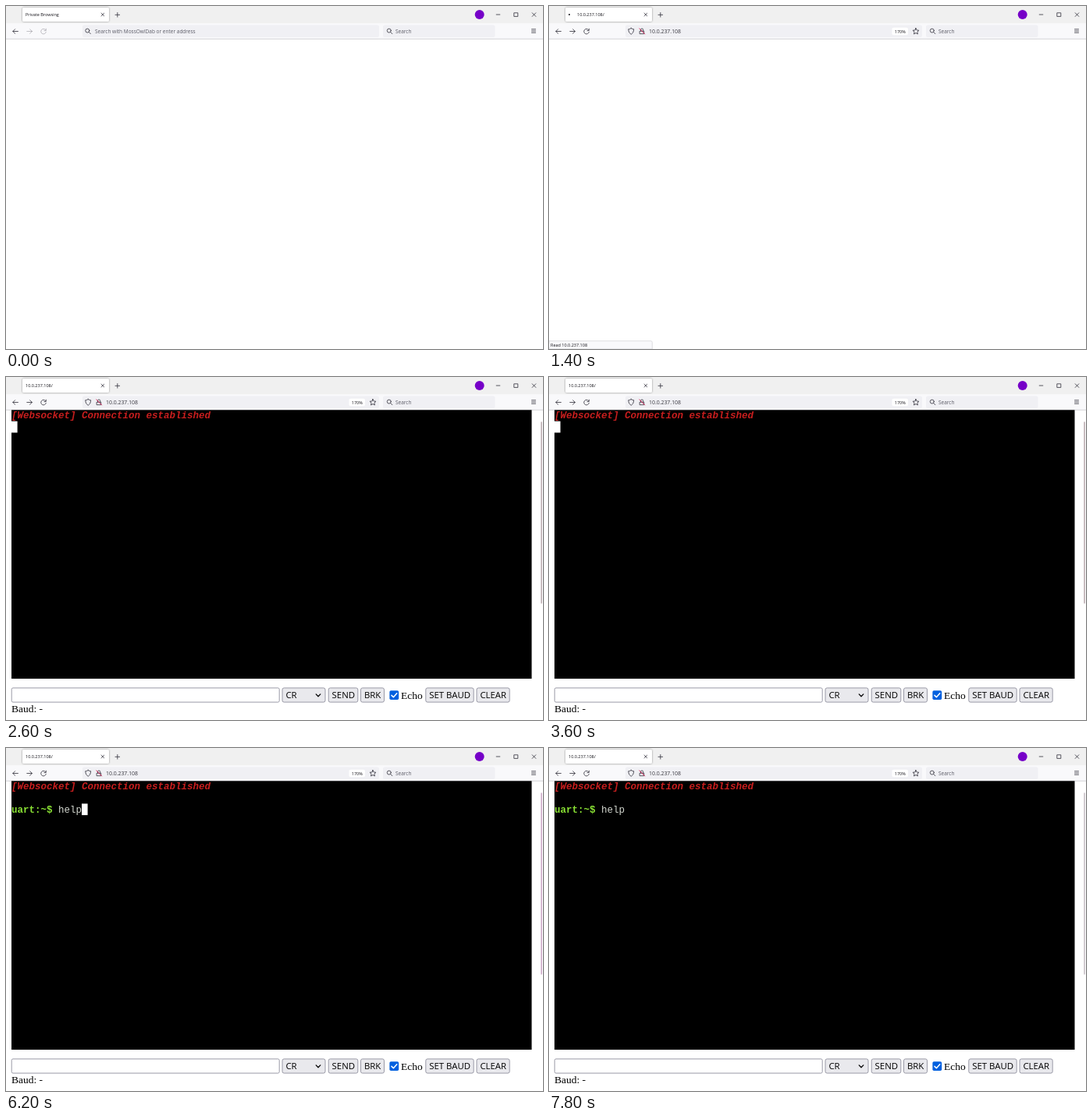
An HTML page for the animation above (8 s loop, 688 px wide and 440 px high).

```html
<!DOCTYPE html>
<html lang="en">
<head>
<meta charset="utf-8">
<title>Serial terminal</title>
<style>
  html, body { margin: 0; width: 100%; height: 100%; overflow: hidden; background: #fff; }
  svg { display: block; width: 100%; height: 100%; }
  text { white-space: pre; }
  .ui { font-family: "Open Sans", "Noto Sans", sans-serif; fill: #15141a; }
  .tab { font-size: 5.5px; }
  .field { font-size: 6.5px; fill: #5b5b66; }
  .button { font-size: 11.4px; fill: #000; }
  .serif { font: 13.5px "Liberation Serif", serif; }
  .mono { font: 12.5px "Liberation Mono", monospace; }
  .line { fill: none; stroke: #3a3944; stroke-width: .85; stroke-linecap: round; stroke-linejoin: round; }
  .control { fill: #e9e9ed; stroke: #8f8f9d; stroke-width: .9; }
</style>
</head>
<body>
<svg viewBox="0 0 688 440" preserveAspectRatio="none">
  <defs>
    <filter id="shadow" x="-5%" y="-20%" width="110%" height="150%">
      <feDropShadow dx="0" dy="0" stdDeviation=".9" flood-color="#000" flood-opacity=".45"/>
    </filter>
    <clipPath id="tabClip"><rect x="21" y="2" width="111" height="18" rx="2"/></clipPath>
    <g id="lens" class="line"><circle cx="-.7" cy="-.9" r="2.5"/><path d="M1.2 1 3.4 3.2"/></g>
  </defs>

  <!-- Window and tab -->
  <rect width="688" height="22.5" fill="#f0f0f0"/>
  <rect x="21" y="2" width="111" height="18" rx="2" fill="#fff" filter="url(#shadow)"/>
  <g clip-path="url(#tabClip)"><circle id="burst" cx="29.7" cy="11" r="9.2" fill="#a9c9fb"/></g>
  <circle id="throbber" cy="11" r="1" fill="#15141a"/>
  <text id="title" class="ui tab" y="13.3"></text>
  <path class="line" d="m122 9.2 3.6 3.6m0-3.6-3.6 3.6M140 11.3h5.6m-2.8-2.8v5.6"/>
  <circle cx="606.7" cy="11" r="6" fill="#7600c8"/>
  <path class="line" d="M628.2 11h4.6M651.2 8.8h4.6v4.6h-4.6zM674.2 8.8l4.6 4.6m0-4.6-4.6 4.6"/>

  <!-- Toolbar -->
  <rect y="22.5" width="688" height="20" fill="#f9f9fb"/>
  <path d="M0 42.3h688" stroke="#cccccf" stroke-width=".8"/>
  <rect x="98" y="24.5" width="380" height="15.5" rx="2" fill="#f0f0f4"/>
  <rect x="483" y="24.5" width="143.5" height="15.5" rx="2" fill="#f0f0f4"/>
  <path class="line" d="M15.4 32.5H8.8m2.8-2.8-2.8 2.8 2.8 2.8"/>
  <path id="forward" class="line" d="M26.8 32.5h6.6m-2.8-2.8 2.8 2.8-2.8 2.8"/>
  <g id="reload"><path class="line" d="M50.6 30.5A3.3 3.3 0 1 0 51.3 33.4M51.3 29.2v2.4h-2.4"/></g>
  <use href="#lens" x="491.5" y="32.5"/>
  <text class="ui field" x="499" y="34.9">Search</text>
  <path class="line" d="M673.5 29.8h5M673.5 32h5M673.5 34.2h5"/>
  <use id="urlLens" href="#lens" x="105" y="32.5"/>
  <text id="url" class="ui field" y="34.9"></text>
  <g id="siteIcons">
    <path class="line" d="M105.2 28.6q1.7 1.2 3.5 1.2 0 4.8-3.5 6.6-3.5-1.8-3.5-6.6 1.8 0 3.5-1.2z"/>
    <path class="line" d="M116.5 32.2h5.2v3.5h-5.2zM117.5 32v-1.4a1.6 1.6 0 0 1 3.2 0V32"/>
    <path class="line" stroke-width="1" d="m115.8 28.9 6.8 7" style="stroke:#d70040"/>
    <rect x="439.5" y="27.7" width="20.5" height="9.6" rx="1.8" fill="#fff"/>
    <text class="ui tab" x="442.8" y="34.5">170%</text>
    <path id="star" class="line"/>
  </g>

  <g id="status">
    <path d="M0 429.7h130.5q1.8 0 1.8 1.8V440H0z" fill="#f9f9fb" stroke="#d3d3d6" stroke-width=".7"/>
    <text class="ui tab" x="2" y="437.3">Read 10.0.237.108</text>
  </g>

  <!-- Terminal page -->
  <g id="page">
    <rect x="7" y="42.3" width="666.5" height="344.7"/>
    <g class="mono">
      <text id="notice" x="7" y="52.6" fill="#c81e1e" font-weight="bold" font-style="italic">[Websocket] Connection established</text>
      <g id="prompt">
        <text x="7" y="82.6" fill="#8ae234" font-weight="bold">uart:~$</text>
        <text id="typed" x="67" y="82.6" fill="#d3d7cf"></text>
      </g>
    </g>
    <rect id="cursor" width="7.6" height="14.7" fill="#fff"/>
    <rect id="scrollbar" x="685.3" y="57.5" width="1.5" height="233"/>
    <rect x="7.2" y="398.9" width="343" height="18.2" rx="1.8" fill="#fff" stroke="#8f8f9d" stroke-width=".9"/>
    <g id="buttons"></g>
    <path class="line" d="m397.2 406.9 2.8 2.8 2.8-2.8" style="stroke:#000;stroke-width:1.3"/>
    <rect x="491.4" y="402.3" width="11.8" height="11.8" rx="1.8" fill="#0060df"/>
    <path class="line" d="m494 408.4 2.4 2.4 4.4-5" style="stroke:#fff;stroke-width:1.5"/>
    <text class="serif" x="506" y="412.8">Echo</text>
    <text class="serif" x="7" y="430.2">Baud: -</text>
  </g>
</svg>
<script>
const LOOP = 8000, STEP = 200, ADDRESS = "10.0.237.108";
const LOADING = 1000, LOADED = 1600, CONNECTED = 2600, PROMPT = 4200, TYPING = 5000, CURSOR_OFF = 7800;
const $ = id => document.getElementById(id);
const set = (id, attributes) => {
  for (const [name, value] of Object.entries(attributes)) $(id).setAttribute(name, value);
};
const show = (id, visible) => { $(id).style.display = visible ? "" : "none"; };

const buttons = [["CR", 354, 55], ["SEND", 413.2, 37.6], ["BRK", 454.5, 30], ["SET BAUD", 537.8, 61.4], ["CLEAR", 603, 42.2]];
$("buttons").innerHTML = buttons.map(([label, x, width]) =>
  `<rect class="control" x="${x}" y="398.9" width="${width}" height="18.2" rx="2.2"/>
   <text class="ui button" x="${x + 4.4}" y="412.2">${label}</text>`).join("");

const starPoints = Array.from({ length: 10 }, (_, i) => {
  const angle = i * Math.PI / 5 - Math.PI / 2, radius = i % 2 ? 2 : 4.2;
  return `${470 + radius * Math.cos(angle)} ${32.6 + radius * Math.sin(angle)}`;
});
set("star", { d: `M${starPoints.join("L")}z` });

function draw(time) {
  const t = Math.floor(time % LOOP / STEP) * STEP;
  const loading = t >= LOADING && t < LOADED;
  const loaded = t >= LOADED;
  const visited = loading || loaded;

  $("title").textContent = visited ? ADDRESS + "/" : "Private Browsing";
  set("title", { x: visited && t <= LOADED ? 36 : 25 });
  show("throbber", loading);
  set("throbber", { cx: 29.5 - 3.5 * Math.cos((t - 1400) / 800 * 2 * Math.PI) });
  set("burst", { opacity: loaded ? Math.max(0, 1 - (t - LOADED) / 400) : 0 });

  const typedAddress = ADDRESS.slice(0, t / STEP * 3);
  $("url").textContent = typedAddress || "Search with MossOwlDab or enter address";
  set("url", { x: visited ? 128 : 114 });
  $("url").style.fontSize = typedAddress ? "6.9px" : "";
  $("url").style.fill = typedAddress ? "#38373f" : "";
  set("forward", { opacity: visited ? 1 : .35 });
  set("reload", { opacity: visited ? 1 : .35 });
  show("urlLens", !visited);
  show("siteIcons", visited);
  show("status", loading);

  show("page", loaded);
  show("notice", t >= CONNECTED);
  show("prompt", t >= PROMPT);
  const command = t < TYPING ? "" : t < TYPING + STEP ? "hel" : "help";
  $("typed").textContent = command;
  const row = t < CONNECTED ? 0 : t < PROMPT ? 1 : 2;
  const column = row === 2 ? 8 + command.length : 0;
  set("cursor", { x: 7 + column * 7.5, y: 42 + row * 14.7 });
  show("cursor", t < CURSOR_OFF);
  set("scrollbar", { fill: t < 6200 ? "#b7a7ac" : t < 7400 ? "#c9a3c4" : "#c4bcc2" });
}

function tick() {
  draw(performance.now());
  requestAnimationFrame(tick);
}
tick();
</script>
</body>
</html>
```
